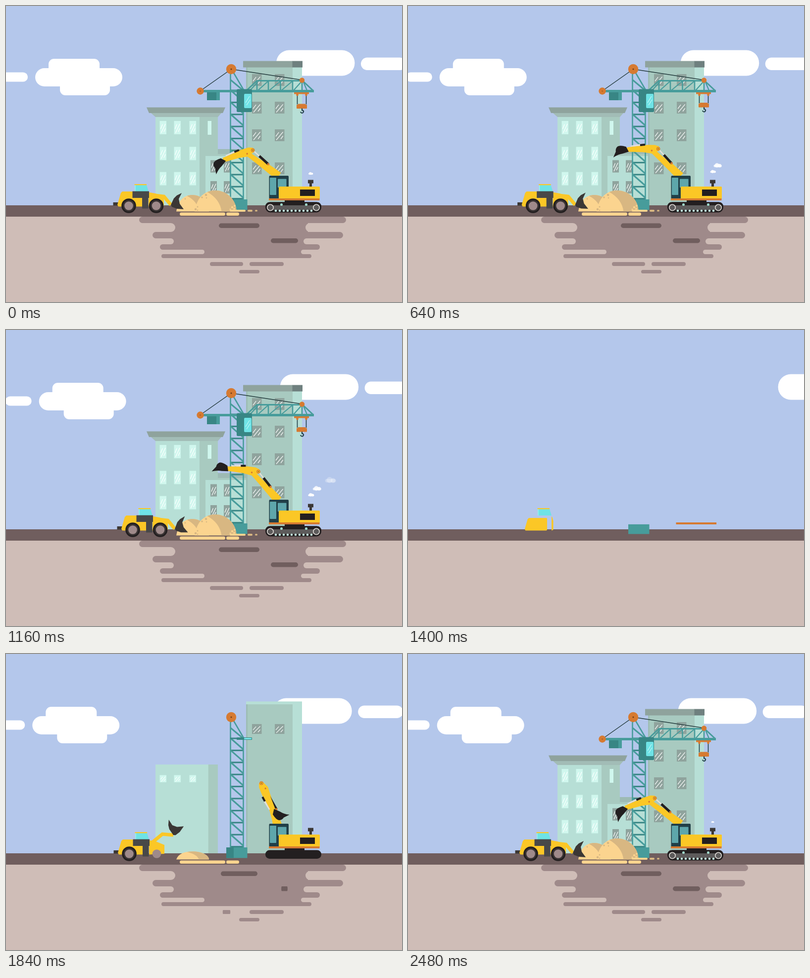
An HTML page with a canvas for the animation above (2.52 s loop, 800x600 px).

```html
<!DOCTYPE html>
<html lang="en">
<head>
<meta charset="utf-8">
<title>Construction site</title>
<style>
html, body { margin: 0; width: 100%; height: 100%; overflow: hidden; background: #b4c7eb; }
canvas { display: block; }
</style>
</head>
<body>
<canvas id="stage" width="800" height="600"></canvas>
<script>
const g = document.getElementById('stage').getContext('2d');
const LOOP = 2520, STEP = 40, START = 1200;
const C = {
  sky: '#b4c7eb', strip: '#705e5e', ground: '#cfbdb7', shade: '#9f8a8a',
  mint: '#b7dfd6', mintDark: '#a8cac0', grey: '#8fa39d', greyDark: '#6f807f', eave: '#a2bcb6',
  glass: '#d0f7ee', teal: '#479c9b', tealDark: '#388685', cyan: '#6fe3e6', orange: '#d67a31',
  yellow: '#fbc726', black: '#231f20', coal: '#3b3735', iron: '#484848', cab: '#213f47',
  pane: '#5ea6ab', sand: '#fbd48f', sandDark: '#d8b782', rod: '#e3dfda'
};
let u = 0; // time in the build cycle, running from START to START + LOOP

// timing
const prog = (a, b) => Math.min(1, Math.max(0, (u - a) / (b - a)));
const smooth = p => p * p * (3 - 2 * p);
const out = (a, b) => 1 - (1 - prog(a, b)) ** 3;
const back = (a, b) => {
  const q = prog(a, b) - 1;
  return 1 + 2.7 * q ** 3 + 1.7 * q * q;
};
function key(...k) { // key(time, value, time, value, ...)
  if (u <= k[0]) return k[1];
  for (let i = 2; i < k.length; i += 2)
    if (u < k[i]) return k[i - 1] + (k[i + 1] - k[i - 1]) * smooth(prog(k[i - 2], k[i]));
  return k[k.length - 1];
}

// drawing
const rect = (c, x0, y0, x1, y1) => { g.fillStyle = c; g.fillRect(x0, y0, x1 - x0, y1 - y0); };
function pill(c, x0, y0, x1, y1, r = (y1 - y0) / 2) {
  g.fillStyle = c;
  g.beginPath();
  g.roundRect(x0, y0, x1 - x0, y1 - y0, r);
  g.fill();
}
function trace(pts) {
  g.beginPath();
  for (let i = 0; i < pts.length; i += 2) g.lineTo(pts[i], pts[i + 1]);
}
function poly(c, ...pts) { trace(pts); g.closePath(); g.fillStyle = c; g.fill(); }
function line(c, w, ...pts) { trace(pts); g.strokeStyle = c; g.lineWidth = w; g.stroke(); }
function disc(c, x, y, r) { g.fillStyle = c; g.beginPath(); g.arc(x, y, r, 0, 7); g.fill(); }
function grow(x, y, kx, ky, draw) {
  if (kx <= 0 || ky <= 0) return;
  g.save();
  g.translate(x, y); g.scale(kx, ky); g.translate(-x, -y);
  draw();
  g.restore();
}
const pop = (x, y, k, draw) => grow(x, y, k, k, draw);
const rise = (y, k, draw) => grow(0, y, 1, k, draw);
const widen = (x, k, draw) => grow(x, 0, k, 1, draw);
function turned(x, y, deg, draw) {
  g.save();
  g.translate(x, y); g.rotate(deg * Math.PI / 180);
  draw();
  g.restore();
}
function at(x, y, deg, lx, ly) {
  const a = deg * Math.PI / 180, c = Math.cos(a), s = Math.sin(a);
  return [x + lx * c - ly * s, y + lx * s + ly * c];
}
function pane(c, x, y, w, h) {
  rect(c, x, y, x + w, y + h);
  line('#fff', 1.2, x + 2, y + h * .6, x + w * .42, y + h * .25);
  line('#fff', 1.2, x + 3, y + h * .9, x + w * .85, y + h * .22);
  line('#fff', 1.2, x + w * .62, y + h * .82, x + w * .85, y + h * .56);
}

function clouds() {
  const drift = u < 2920 ? (u - 2520) * .0085 : 3.4 + (u - 2920) * .0056;
  const far = 1 - smooth(prog(START, 1800));
  const cloud = (dx, ...box) => pill('#fff', box[0] + dx, box[1], box[2] + dx, box[3], box[4]);
  const left = drift - 400 * far, right = drift + 285 * far;
  cloud(left, -9, 134.5, 44, 153.5);
  cloud(left, 86, 107, 189, 140, 11);
  cloud(left, 59, 126, 235, 163);
  cloud(left, 109, 150, 210, 181, 11);
  cloud(right, 546, 89.5, 704.5, 141.5);
  cloud(right, 717, 104.5, 808, 130);
}

function shadow() {
  const bar = (c, x0, y0, x1, y1, a, b) =>
    widen((x0 + x1) / 2, out(a, b), () => pill(c, x0, y0, x1, y1));
  widen(478, out(1440, 1700), () => rect(C.shade, 330, 427, 610, 511));
  widen(478, out(1440, 1700), () => pill(C.shade, 269, 427, 687, 440));
  bar(C.shade, 296, 458, 681, 471, 1480, 1740);
  bar(C.shade, 311, 483, 634, 494, 1520, 1780);
  bar(C.shade, 314, 503, 617, 511, 1550, 1810);
  pill(C.ground, 240, 440, 342, 458);
  pill(C.ground, 605, 440, 720, 458);
  pill(C.ground, 240, 471, 339, 483);
  pill(C.ground, 601, 471, 720, 483);
  pill(C.ground, 240, 494, 401, 503);
  pill(C.ground, 596, 494, 720, 503);
  bar(C.shade, 412, 519, 479, 527, 1820, 2060);
  bar(C.shade, 492, 519, 561, 527, 1620, 1840);
  bar(C.shade, 471, 535, 512, 542, 1640, 1840);
  bar(C.strip, 430, 440.5, 512, 450, 1700, 1960);
  bar(C.strip, 535, 471, 590, 480.5, 1820, 2060);
}

function tower() {
  rise(404, back(1600, 2000), () => rect(C.mint, 485, 124, 598, 404));
  rise(404, back(1640, 2060), () => {
    rect(C.mintDark, 485, 124, 579, 404);
    rect('#9dbdb4', 485, 124, 488, 404);
  });
  [138, 194, 250, 317].forEach((y, i) => rise(y + 24, out(1750 + i * 90, 1950 + i * 90), () => {
    pane(C.grey, 497, y, 19.5, 24);
    pane(C.grey, 543, y, 19.5, 24);
  }));
  widen(479, out(1880, 2080), () => rect(C.grey, 479, 111.5, 579, 124.5));
  widen(599, out(2000, 2300), () => rect(C.greyDark, 578.5, 111.5, 599, 124.5));
}

function house() {
  rise(404, out(1480, 1800), () => rect(C.mint, 302, 224, 428, 404));
  widen(428, out(1790, 2020), () => rect(C.mintDark, 391, 224, 428, 404));
  [233, 285.5, 336.5].forEach((y, i) => rise(y + 27, out(1790 + i * 90, 2010 + i * 90), () => {
    for (const x of [310.5, 339.5, 370.5]) pane(C.glass, x, y, 13.5, 27);
  }));
  rise(261, out(1940, 2130), () => rect(C.glass, 407.5, 233, 415, 261));
  rise(225, out(2040, 2160), () => poly(C.eave, 293, 217, 435, 217, 428, 225, 302, 225));
  rise(217, out(2140, 2360), () => poly(C.grey, 284, 205.5, 443, 205.5, 438, 217, 289, 217));
}

function annex() {
  rise(304, out(2180, 2380), () => rect('#9dbab4', 428, 290, 485, 304));
  rise(404, out(1920, 2130), () => rect(C.mint, 403, 300, 485, 404));
  widen(403, out(2180, 2380), () => rect(C.mintDark, 402, 300, 485, 304));
  [312.5, 355].forEach((y, i) => {
    for (const x of [413, 440])
      widen(x, out(2130 + i * 50, 2350 + i * 50), () => pane(C.grey, x, y, 13, 25));
  });
}

function crane() {
  rise(413.5, out(1300, 1480), () => rect(C.teal, 445, 392, 487.5, 413.5));
  widen(445, out(1480, 1640), () => rect(C.tealDark, 445, 392, 460, 413.5));
  rise(392, out(1480, 1800), () => {
    for (let y = 171; y < 380; y += 24.4) {
      line(C.teal, 3.2, 454, y, 479, y + 22);
      line(C.tealDark, 3, 453, y + 24.4, 480, y + 24.4);
    }
    line(C.teal, 3, 454, 150, 479, 171);
    line(C.teal, 2.6, 453.5, 134, 453.5, 392);
    line(C.teal, 2.6, 479.5, 169, 479.5, 392);
    line(C.teal, 2.6, 459, 134, 480, 170);
    line(C.tealDark, 3, 453, 171, 480, 171);
  });

  const block = out(2180, 2360);
  rise(174, block, () => {
    rect(C.tealDark, 406, 174, 425, 191);
    rect(C.teal, 425, 174, 432, 191);
  });
  grow(392, 170, back(2020, 2260), u < 2020 ? 0 : .75 + .25 * out(2080, 2320), () => {
    rect(C.teal, 392, 170, 622, 175);
    line(C.teal, 3, 484, 173, 507, 151.5, 599, 151.5, 621, 172);
    const posts = [507, 530, 554.5, 579, 598];
    posts.forEach((x, i) => {
      line(C.teal, 2.6, x, 151, x, 172);
      if (i) line(C.teal, 2.2, posts[i - 1] + 2, 171, x, 152);
    });
    line(C.teal, 2.2, 493, 171, 507, 156);
    line(C.teal, 2.2, 600, 152, 608, 171);
  });
  rise(169, out(1830, 2100), () => {
    pill(C.tealDark, 466, 168.5, 497, 215, 2.5);
    pill(C.cyan, 481, 178, 496, 207, 2);
    line('#c5f7f7', 1.2, 484, 196, 492, 183);
    line('#c5f7f7', 1.2, 486, 201, 493, 190);
  });

  const cable = out(2200, 2400);
  if (cable > 0) {
    line('#243b3d', 1.5, 455, 128, 455 - 63 * cable, 128 + 44.5 * cable);
    line('#243b3d', 1.5, 455, 128, 455 + 143 * cable, 128 + 22 * cable);
  }
  pop(455, 128, out(1700, 1820), () => {
    disc(C.orange, 455, 128, 10.2);
    disc('#6d3c19', 455, 128, 1.5);
  });
  pop(392.5, 172.5, out(2180, 2340), () => {
    disc(C.orange, 392.5, 172.5, 7.2);
    disc('#a85c22', 392.5, 172.5, 1.2);
  });
  pop(598, 150.5, out(2200, 2360), () => disc(C.orange, 598, 150.5, 5.2));
  hook();
}

function hook() {
  const drop = key(2480, 2.5, 2880, 0, 3400, 0, 3680, 1);
  rise(175, out(2220, 2420), () => {
    rect(C.orange, 582, 175, 612, 178.5);
    for (const x of [588.5, 606.5]) {
      line('#213f47', 1.6, x, 179, x, 197 + drop);
      disc(C.orange, x, 180, 2.4);
    }
    rect(C.orange, 590, 196 + drop, 605, 199 + drop);
    pill(C.orange, 587, 197.5 + drop, 608, 205.5 + drop, 1);
    g.beginPath();
    g.moveTo(598, 205 + drop);
    g.lineTo(598, 209 + drop);
    g.arc(598, 211.5 + drop, 3, -1, 3);
    g.strokeStyle = C.cab; g.lineWidth = 2; g.stroke();
  });
}

function mound(x0, x1, top, kx, ky, cut) {
  const mid = (x0 + x1) / 2, half = (x1 - x0) / 2, h = 416.5 - top;
  const dome = () => {
    g.beginPath();
    g.moveTo(x0, 416.5);
    g.bezierCurveTo(x0 + half * .12, 416.5 - h * .72, x0 + half * .5, top, mid, top);
    g.bezierCurveTo(x1 - half * .45, top, x1, 416.5 - h * .55, x1, 416.5);
    g.closePath();
  };
  grow(mid, 416.5, kx, ky, () => {
    dome(); g.fillStyle = C.sand; g.fill(); g.clip();
    g.beginPath();
    g.moveTo(cut, top + 2);
    g.quadraticCurveTo(cut + half * .65, 416.5 - h * .6, cut + half * .72, 417);
    g.lineTo(x1 + 2, 417); g.lineTo(x1 + 2, top - 2); g.lineTo(cut + half * .1, top - 2);
    g.fillStyle = C.sandDark; g.fill();
  });
}

function sand() {
  widen(397, out(1640, 1820), () => pill(C.sand, 351, 418.5, 443, 425));
  widen(458, out(1660, 1830), () => pill(C.sand, 445, 418.5, 471, 425));
  mound(344, 410, 383, out(1700, 1850), out(1800, 2000), 366);
  mound(381, 465.5, 374, back(1880, 2200), back(1880, 2260), 405);
  const k = out(2000, 2180);
  for (const [x, y, r] of [[404, 383, 2.3], [396, 388, 1.8], [405, 389, 1.3], [383, 412, 2.2], [387, 407, 1.5], [387, 414, 1.3], [362, 391, 1.4]])
    pop(x, y, k, () => disc(C.sandDark, x, y, r));
  for (const [x, y, r] of [[457, 408, 2.2], [462, 405, 2], [461, 411, 2], [453, 412, 1.6]])
    pop(x, y, k, () => disc(C.sand, x, y, r));
  widen(455, out(2060, 2320), () => pill(C.sand, 452, 413, 484, 417));
  pop(493, 415, out(2120, 2320), () => pill(C.sandDark, 488, 413, 498, 417));
  pop(505.5, 415, out(2220, 2380), () => pill(C.sandDark, 503, 413.2, 508, 416.6));
}

function loader() {
  g.save();
  g.translate(key(1400, 2, 1840, 1, 2160, 1.3, 2500, 0, 2720, 0, 3400, 6.5, 3680, 8), 0);

  pop(226, 401, out(1560, 1720), () => rect(C.coal, 216.5, 398, 228, 404.5));
  pop(279, 407, out(1300, 1520), () => {
    g.lineJoin = 'round';
    poly(C.yellow, 225, 403, 232, 379, 235, 376, 278, 376, 279, 378, 279, 405, 277, 406.5, 227, 406.5);
  });
  rise(376, out(1300, 1420), () => {
    poly(C.cyan, 260, 363, 284, 363, 288, 376, 260, 376);
    line('#b9f4f4', 1, 261, 363, 261, 376);
    rect(C.yellow, 259.5, 361, 284, 363.2);
  });
  widen(288, out(1390, 1640), () => poly(C.yellow, 288, 377.5, 302, 380, 319, 387, 319, 405, 288, 406.5));
  rise(376, out(1520, 1680), () => rect(C.iron, 255.5, 375.5, 289, 389));
  rise(388, out(1580, 1740), () => rect(C.iron, 275, 388, 287.5, 410.5));

  const wx = key(1840, 337, 2160, 334, 2500, 333);
  const wy = key(1840, 367, 2160, 401, 2500, 403);
  const ex = key(1840, 315, 2160, 319);
  const ey = key(1840, 365, 2160, 386);
  pop(298, 384, out(1640, 1800), () => {
    line(C.yellow, 7, 293, 383, ex, ey, wx, wy);
    turned(wx, wy, key(1840, -59, 2160, -8, 2500, 0, 2720, 3, 3400, -4), () =>
      poly(C.coal, 0, 0, 6, -13, 12, -19, 22, -24, 16, -12, 18, -2, 26, 9, 12, 8, 2, 4));
  });

  const wheel = (x, rim, hub) => {
    pop(x, 405, rim, () => { disc(C.black, x, 405, 14.8); disc('#3a3434', x, 405, 11.5); });
    pop(x, 405, hub, () => disc(C.shade, x, 405, 8.8));
  };
  wheel(248, out(1620, 1780), out(1600, 1740));
  wheel(303.5, out(1845, 2020), out(1740, 1850));
  g.restore();
}

function tracks() {
  widen(580, out(1500, 1720), () => pill(C.black, 524, 397.5, 637, 415, 8.5));
  rise(400, out(1860, 2080), () => pill(C.black, 524, 397.5, 637, 418.5, 10));
  widen(580, out(1900, 2120), () => pill('#5d5b5b', 538, 404, 623, 413.5, 3));
  const wheel = (x, k) => pop(x, 408.5, k, () => {
    disc(C.rod, x, 408.5, 7);
    disc('#5d5b5b', x, 408.5, 5.4);
  });
  wheel(627, out(1980, 2140));
  wheel(534, out(2140, 2320));
  for (let i = 0; i < 10; i++) {
    const a = 2320 - i * 34;
    pop(545 + i * 8, 415, out(a, a + 90), () => disc('#c2ebe0', 545 + i * 8, 415, 2.3));
  }
  for (const x of [556.5, 606.5]) pop(x, 402.5, out(2000, 2150), () => disc('#9ed5c8', x, 402.5, 2.6));
}

function excavator() {
  tracks();
  widen(583, out(1500, 1660), () => rect(C.black, 563, 393, 603, 398));
  rise(366, out(1680, 1810), () => {
    rect(C.coal, 610, 352.5, 621, 359.5);
    rect(C.coal, 613, 359, 618, 366.5);
  });
  arm();
  rise(391, out(1500, 1700), () => {
    pill(C.cab, 531.5, 344, 571, 391, 2);
    pill(C.pane, 533, 348, 546, 383, 1);
    pill(C.pane, 549, 350.5, 566.5, 368, 1);
  });
  widen(634, out(1440, 1660), () => pill(C.yellow, 551, 366, 634, 391, 1.5));
  widen(609, out(1620, 1780), () => rect(C.black, 594, 372, 624, 385));
  widen(582.5, out(1330, 1500), () => rect(C.orange, 531, 390, 633.5, 394));
}

function arm() {
  const px = 547, py = 343;
  const boom = key(1840, 252, 2160, 217.5, 2500, 216, 2720, 216.3, 3400, 225, 3680, 227);
  const stick = key(1840, 70, 2160, 193.5, 2500, 165, 3400, 186, 3680, 189);
  const bucket = key(1840, 13, 2160, 160, 2500, 118, 2760, 119, 3400, 167, 3680, 172);
  const [jx, jy] = at(px, py, boom, 74, 0);
  const [cx, cy] = at(jx, jy, stick, -13, 4);
  const [dx, dy] = at(px, py, boom, 27, 8);
  const [wx, wy] = at(jx, jy, stick, 50, 0);
  pop(px, py, out(1600, 1800), () => {
    turned(px, py, boom, () =>
      poly(C.yellow, -4, -9, -4, 9, 24, 8.5, 50, 6, 78, 5, 79, -4, 48, -5, 10, -7));
    const mx = dx + (cx - dx) * .58, my = dy + (cy - dy) * .58;
    line(C.rod, 2.5, mx, my, cx, cy);
    line(C.black, 5, dx, dy, mx, my);
    disc(C.orange, dx, dy, 2.4);
    turned(jx, jy, stick, () => {
      line(C.rod, 2.5, 24, 11, 43, 7);
      poly(C.yellow, -17, 4, -14, 9, -6, 11.5, 10, 11, 50, 4.5, 51, -4.5, 18, -4, 0, -6, -14, 0);
      line(C.rod, 2, 22, 10, 42, 7);
      line(C.black, 4, 14, 11.5, 24, 10);
      disc(C.orange, 0, 0, 1.7);
    });
    disc(C.orange, cx, cy, 3.8);
    disc(C.yellow, cx, cy, 2.2);
    disc('#6d3c19', cx, cy, 1);
    turned(wx, wy, bucket, () => {
      g.beginPath();
      g.moveTo(-1, -5.5);
      g.lineTo(-1, 6);
      g.quadraticCurveTo(8, 15, 14, 14.5);
      g.quadraticCurveTo(20, 13, 22, 7);
      g.lineTo(32, -1);
      g.quadraticCurveTo(20, 0, 12, -3);
      g.fillStyle = C.black;
      g.fill();
    });
  });
}

function smoke() {
  for (let born = 2460; born < u; born += 460) {
    const a = (u - born) / 460, s = Math.min(1, (u - born) / 30) * (.8 + a * .45);
    const x = 615.5 + 1.5 * a + 6 * Math.max(0, a - 1) * (1 + a), y = 341 - 8.5 * a - 1.9 * a * a;
    g.globalAlpha = Math.max(0, Math.min(1, 1.6 - a * .5));
    pill('#fff', x - 5.5 * s, y - 1.5 * s, x + 5.5 * s, y + 2 * s);
    disc('#fff', x - 1 * s, y - .5 * s, 3 * s);
    disc('#fff', x + 2.5 * s, y, 2.4 * s);
    g.globalAlpha = 1;
  }
}

function frame(now) {
  const t = Math.floor(now % LOOP / STEP) * STEP;
  u = t < START ? t + LOOP : t;
  rect(C.sky, 0, 0, 800, 600);
  clouds();
  rect(C.strip, 0, 404, 800, 427);
  rect(C.ground, 0, 427, 800, 600);
  shadow();
  tower();
  house();
  annex();
  crane();
  sand();
  loader();
  excavator();
  smoke();
}

const origin = performance.now();
(function tick() {
  frame(performance.now() - origin);
  requestAnimationFrame(tick);
})();
</script>
</body>
</html>
```
